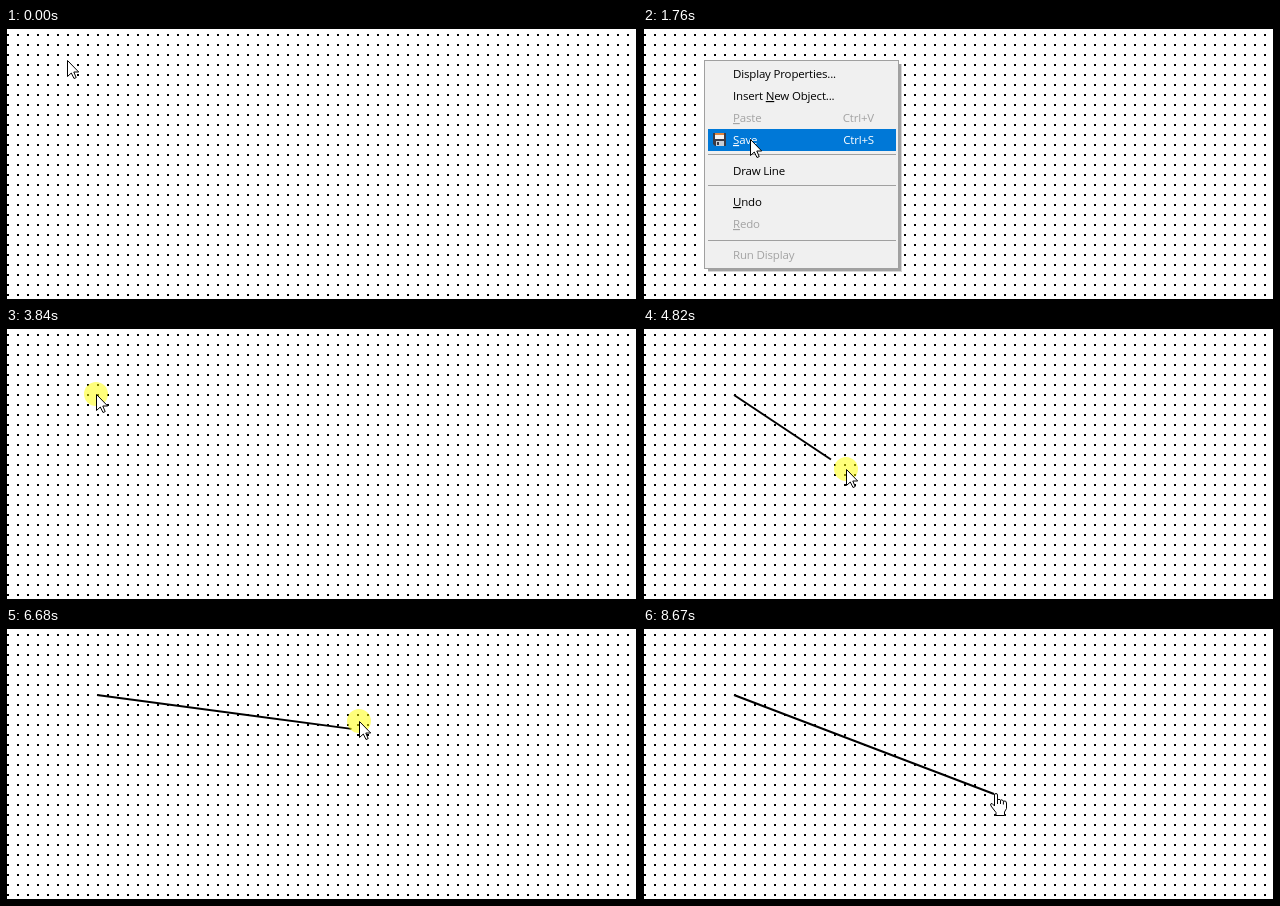
Recreate the animation shown at these times as an HTML page. Size 631 by 272 pixels, loop 9880 ms.

```html
<!DOCTYPE html>
<html lang="en">
<head>
<meta charset="utf-8">
<title>Drawing a line</title>
<style>
html, body { margin: 0; width: 100%; height: 100%; overflow: hidden; background: #fff; }
svg { display: block; width: 100%; height: 100%; }
text { font: 11.5px "Open Sans", "Noto Sans", sans-serif; letter-spacing: -.17px; fill: #000; }
.key { text-decoration: underline; }
.off text { fill: #a3a3a3; }
.bar { fill: #0078d7; visibility: hidden; }
.on .bar { visibility: visible; }
.on text { fill: #fff; }
.cursor { fill: #fff; stroke: #000; stroke-linejoin: round; }
</style>
</head>
<body>
<svg viewBox="0 0 631 272">
  <defs>
    <pattern id="grid" x="1" y="6" width="10" height="10" patternUnits="userSpaceOnUse">
      <path d="M0 0h2v2h-2z"/>
    </pattern>
  </defs>
  <rect width="631" height="272" fill="#fff"/>
  <rect y="2" width="631" height="270" fill="url(#grid)" shape-rendering="crispEdges"/>
  <rect x=".5" y=".5" width="630" height="271" fill="none" stroke="#000"/>

  <g id="menu">
    <path d="M65 36h194v208h-194z" opacity=".16"/>
    <path d="M65 36h193v207h-193z" opacity=".25"/>
    <rect x="61.5" y="32.5" width="194" height="208" fill="#f0f0f0" stroke="#a0a0a0"/>
    <path d="M65 126.5h188M65 157.5h188M65 212.5h188" stroke="#a0a0a0"/>
  </g>
  <g id="rows"></g>
  <g id="disk">
    <path d="M70 105h13v13h-11l-2-2z" fill="#3b3b46"/>
    <path d="M72 105h9v6h-9z" fill="#f4f4f4"/>
    <path d="M72 105h9v2h-9z" fill="#e0853c"/>
    <path d="M73 113h8v5h-8z" fill="#c9ced6"/>
    <path d="M74 114h2v3h-2z" fill="#3b3b46"/>
  </g>

  <path id="line" fill="none" stroke="#000" stroke-width="2"/>
  <g id="pointer">
    <circle id="halo" r="12" fill="#ff0" opacity=".52"/>
    <g id="press" opacity=".6">
      <circle cx="-1" cy="-3" r="6" fill="#ff0"/>
      <circle r="10.5" fill="none" stroke="#ff0" stroke-width="2.5" stroke-dasharray="12 4"/>
    </g>
    <path id="arrow" class="cursor" d="M.5.5V16.5L4.3 13 7 18.5 9.2 17.6 6.8 12H11.7Z"/>
    <g id="hand" class="cursor" transform="translate(-4 -1)">
      <path d="M4.5 13V2Q4.5.5 6 .5T7.5 2V7Q9 5.3 10.5 7.2 12 6 13.3 8 16.5 7.3 16.5 10V15.5L14.5 19V22.5H6V19.5L1 13Q-.3 10.5 2 10.4Z"/>
      <path d="M7.5 7v4M10.5 7.4V11M13.4 8.2V11.5" fill="none"/>
    </g>
  </g>
</svg>
<script>
const LOOP = 9880, STEP = 70;
const $ = id => document.getElementById(id);
const show = (id, on) => $(id).setAttribute('visibility', on ? 'visible' : 'hidden');
const within = (t, a, b) => t >= a && t < b;

// y of the row centre, label with _ before its access key, shortcut, disabled
const items = [
  [46, 'Display Properties...'],
  [68, 'Insert _New Object...'],
  [90, '_Paste', 'Ctrl+V', true],
  [112, '_Save', 'Ctrl+S'],
  [143, 'Draw Line'],
  [174, '_Undo'],
  [196, '_Redo', '', true],
  [227, 'Run Display', '', true]
];
$('rows').innerHTML = items.map(([y, label, hint = '', off]) => `
  <g class="${off ? 'off' : ''}">
    <rect class="bar" x="65" y="${y - 11}" width="188" height="22"/>
    <text x="90" y="${y + 4}">${label.replace(/_(.)/, '<tspan class="key">$1</tspan>')}</text>
    <text x="231" y="${y + 4}" text-anchor="end">${hint}</text>
  </g>`).join('');
const rows = [...$('rows').children];

const out = u => 1 - (1 - u) ** 2;
const inOut = u => (1 - Math.cos(Math.PI * u)) / 2;

// Quadratic curves: from, control, to
const moves = [
  { at: 1480, n: 11, ease: out, pts: [[61, 32], [88, 88], [132, 144]] },
  { at: 2720, n: 16, ease: inOut, pts: [[132, 144], [111, 105], [90, 66]] },
  { at: 4120, n: 19, ease: inOut, pts: [[90, 66], [180.5, 126.5], [271, 187]] },
  { at: 6130, n: 16, ease: out, pts: [[271, 187], [325.5, 124], [380, 61]] },
  { at: 7430, n: 13, ease: out, pts: [[380, 61], [401, 101.5], [351, 166]] }
];

function position(t) {
  const m = moves.filter(m => t >= m.at).pop();
  if (!m) return moves[0].pts[0];
  const k = Math.floor((t - m.at) / STEP) + 1;
  const u = m.ease(Math.min(1, k / m.n)), v = 1 - u;
  const [a, c, b] = m.pts;
  return [0, 1].map(i => v * v * a[i] + 2 * u * v * c[i] + u * u * b[i]);
}

function menuAlpha(t) {
  if (!within(t, 680, 2390)) return 0;
  return Math.min(1, (Math.floor((t - 680) / STEP) + 1) / 3);
}

function draw(t) {
  const [x, y] = position(t);
  const alpha = menuAlpha(t);
  const picked = within(t, 2390, 2720);
  const fade = picked ? Math.max(0, 1 - .1 * Math.floor((t - 2380) / STEP)
    - .1 * Math.max(0, Math.floor((t - 2520) / STEP))) : alpha;

  $('menu').setAttribute('opacity', alpha);
  $('disk').setAttribute('opacity', alpha);
  $('rows').setAttribute('opacity', fade);
  rows.forEach((row, i) => {
    const [cy, label, , off] = items[i];
    const over = !off && t >= 1480 && Math.abs(y - cy) <= 11;
    const chosen = picked && label === 'Draw Line';
    row.classList.toggle('on', picked ? chosen : over);
    row.style.display = picked && !chosen ? 'none' : '';
  });

  // The line trails the pointer by one step
  const [ex, ey] = position(t - STEP);
  show('line', t >= 4190);
  $('line').setAttribute('d', `M91 67L${ex} ${ey}`);

  const first = within(t, 6060, 6130);
  const down = within(t, 610, 750) || within(t, 3840, 5380) || within(t, 6130, 8340);
  const hand = within(t, 2390, 2720) || within(t, 8340, 8600) || t >= 8670;
  show('press', first);
  show('halo', down);
  show('hand', hand);
  show('arrow', !hand);
  $('pointer').setAttribute('transform', `translate(${Math.round(x)} ${Math.round(y)})`);
}

const begin = performance.now();
function tick() {
  draw((performance.now() - begin) % LOOP);
  requestAnimationFrame(tick);
}
tick();
</script>
</body>
</html>
```
